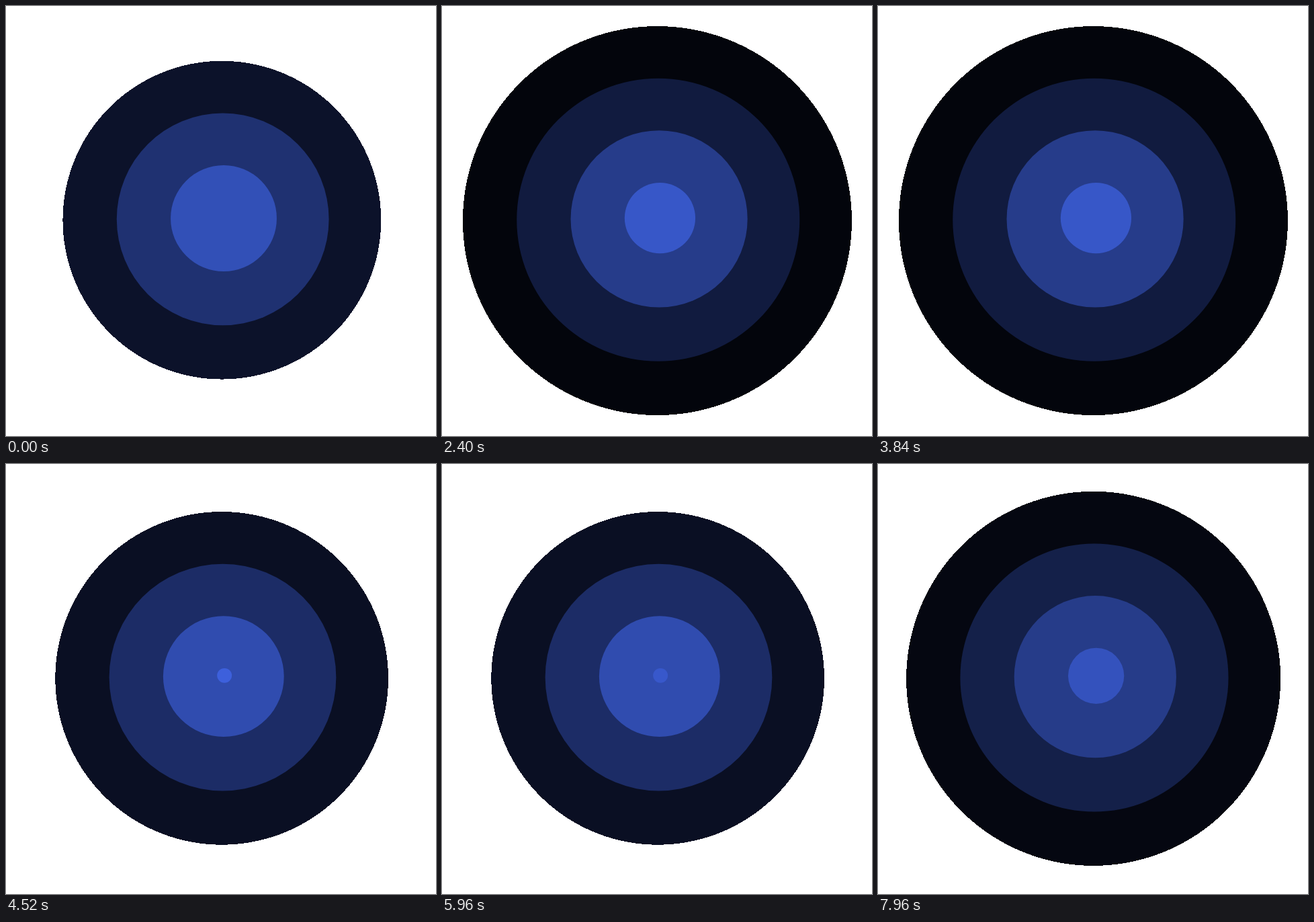
These frames come from a looping animation (640x640 px, 8 s). An HTML page with a canvas:

```html
<!DOCTYPE html>
<html lang="en">
<head>
<meta charset="utf-8">
<title>Tunnel rings</title>
<style>
html, body { margin: 0; width: 100%; height: 100%; overflow: hidden; background: #fff; }
canvas { display: block; width: 100vmin; height: 100vmin; }
</style>
</head>
<body>
<canvas id="stage" width="640" height="640"></canvas>
<script>
const ctx = document.getElementById('stage').getContext('2d');
const SIZE = 640, LOOP = 8000, STEP = 40;
const GAP = 36, LIFE = 144;   // in steps: time between rings, lifetime of a ring
const MAX_R = 315.8, DRIFT = 16 / 3;

// Fades to black over the ring's life, slower at both ends; later rings start darker.
function ringColor(grow, birth) {
  const fade = 1 - grow + 0.062 * Math.sin(grow * Math.PI * 2);
  const blue = (birth < LIFE ? 225 : 207) * fade;
  return `rgb(${[0.275, 0.436, 1].map(k => Math.round(k * blue))})`;
}

function softDisc(cx, cy, r) {
  ctx.beginPath();
  ctx.arc(cx, cy, r, 0, Math.PI * 2);
  ctx.fill();
}

// Whole-pixel rows give the outline its unsmoothed edge.
function hardDisc(cx, cy, r) {
  for (let y = 0; y < SIZE; y++) {
    const half = Math.sqrt(Math.max(0, r * r - (y + 0.5 - cy) ** 2));
    const left = Math.round(cx - half);
    ctx.fillRect(left, y, Math.round(cx + half) - left, 1);
  }
}

function draw(ms) {
  const step = Math.floor((ms % LOOP) / STEP);
  const oldest = step % GAP + LIFE - GAP;
  ctx.fillStyle = '#fff';
  ctx.fillRect(0, 0, SIZE, SIZE);
  for (let age = oldest; age > 0; age -= GAP) {
    const grow = age / LIFE;
    const shift = DRIFT * (1 - grow);
    const disc = age === oldest ? hardDisc : softDisc;
    ctx.fillStyle = ringColor(grow, step - age);
    disc(SIZE / 2 + shift, SIZE / 2 - shift, MAX_R * grow);
  }
}

const start = performance.now();
function tick() {
  draw(performance.now() - start);
  requestAnimationFrame(tick);
}
tick();
</script>
</body>
</html>
```
